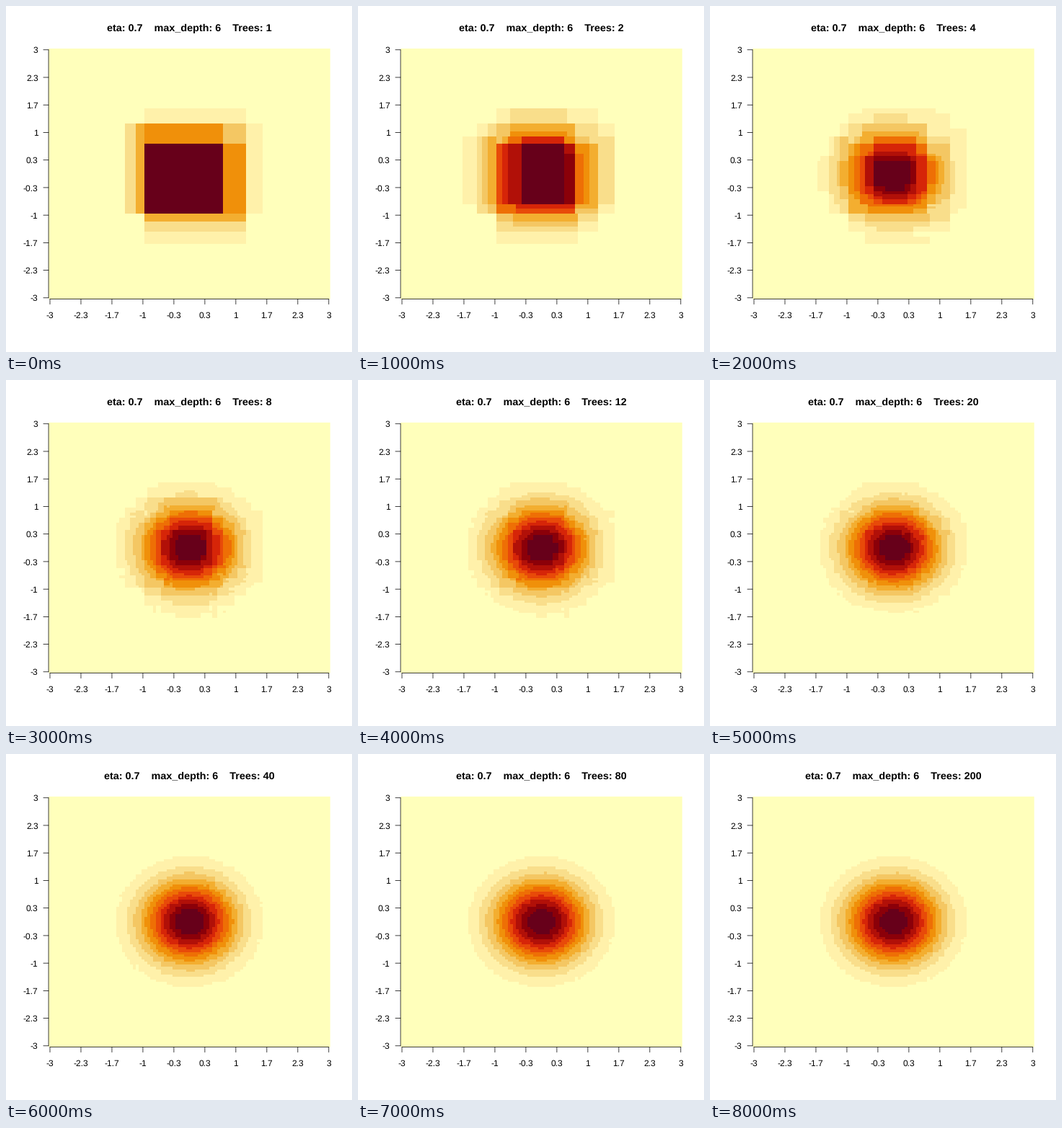
Recreate the animation shown at these times as a matplotlib script. Size 480 px wide and 480 px high, loop 9000 ms.

```python
import numpy as np
import matplotlib.pyplot as plt
from matplotlib.animation import FuncAnimation

SIZE, DPI = 480, 80
PX = 72 / DPI                      # points per pixel
CELLS, ETA, DEPTH = 100, 0.7, 6
TREES = [1, 2, 4, 8, 12, 20, 40, 80, 200]
LEFT, RIGHT, TOP, BOTTOM = 59.04, 449.76, 59.04, 406.56
COLORS = ["#FFFFBB", "#FFF1AA", "#F9DE8B", "#F4C763", "#F3AE30", "#F0900A",
          "#EE6F05", "#E84A09", "#D62508", "#B11008", "#8B0009", "#67001A"]

plt.rcParams["font.family"] = "Liberation Sans"
plt.rcParams["text.hinting"] = "none"


def score(total, count):
    return np.float32(total ** 2 / (count + 1))


def best_cut(grad):
    """Best split of a block; ties go to x, then to the upper cut."""
    best, found = 1e-6, None
    for axis in (0, 1):
        n = grad.shape[axis]
        if n < 2:
            continue
        cum = grad.sum(axis=1 - axis, dtype=float).cumsum()
        low, total = cum[:-1], cum[-1]
        count = np.arange(1, n) * grad.shape[1 - axis]
        gain = (score(low, count) + score(total - low, grad.size - count)
                - score(total, grad.size))
        cut = n - 1 - int(np.argmax(gain[::-1]))
        if gain[cut - 1] > best:
            best, found = gain[cut - 1], (axis, cut)
    return found


def grow(grad, pred, depth=0):
    split = best_cut(grad) if depth < DEPTH else None
    if split is None:
        pred -= np.float32(ETA * grad.sum(dtype=float) / (grad.size + 1))
        return
    axis, cut = split
    for part in (slice(None, cut), slice(cut, None)):
        block = (part, slice(None)) if axis == 0 else (slice(None), part)
        grow(grad[block], pred[block], depth + 1)


def boost():
    """Fit a Gaussian bump with boosted trees, keeping the chosen stages."""
    x = np.linspace(-3, 3, CELLS)
    target = np.exp(-(x[:, None] ** 2 + x ** 2)).astype(np.float32)
    pred = np.full_like(target, 0.5)
    stages = []
    for n in range(1, TREES[-1] + 1):
        grow(pred - target, pred)
        if n in TREES:
            stages.append(pred.copy())
    return stages


def to_rgb(hex_code):
    return [int(hex_code[i:i + 2], 16) for i in (1, 3, 5)]


def cell_of(fraction):
    return np.clip(np.floor(fraction * CELLS), 0, CELLS - 1).astype(int)


def coverage(start, end):
    """Share of each pixel that lies between start and end."""
    return np.clip(np.minimum(pixel + 1, end) - np.maximum(pixel, start), 0, 1)


PALETTE = np.array([to_rgb(c) for c in COLORS])
pixel = np.arange(SIZE)
col = cell_of((pixel + 0.5 - LEFT) / (RIGHT - LEFT))
row = cell_of((BOTTOM - pixel - 0.5) / (BOTTOM - TOP))
alpha = np.outer(coverage(TOP, BOTTOM), coverage(LEFT, RIGHT))[..., None]


def heatmap(z):
    level = (z - z.min()) / (z.max() - z.min())
    bins = np.floor((len(COLORS) - 1e-5) * level).astype(int)
    rgb = PALETTE[bins[np.ix_(col, row)].T]
    return np.rint(255 + (rgb - 255) * alpha).astype(np.uint8)


fig = plt.figure(figsize=(SIZE / DPI, SIZE / DPI), dpi=DPI, facecolor="white")
ax = fig.add_axes([0, 0, 1, 1])
ax.axis("off")

images = [heatmap(z) for z in boost()]
picture = ax.imshow(images[0], extent=(0, SIZE, SIZE, 0),
                    interpolation="nearest", aspect="auto")
ax.set_xlim(0, SIZE)
ax.set_ylim(SIZE, 0)


def line(x0, y0, x1, y1):
    ax.plot([x0, x1], [y0, y1], color="black", lw=0.75 * PX,
            solid_capstyle="round", snap=False)


half_w = (RIGHT - LEFT) / CELLS / 2
half_h = (BOTTOM - TOP) / CELLS / 2
xs = np.linspace(LEFT + half_w, RIGHT - half_w, 10)
ys = np.linspace(BOTTOM - half_h, TOP + half_h, 10)
tick = 7.2

line(xs[0], BOTTOM, xs[-1], BOTTOM)
line(LEFT, ys[0], LEFT, ys[-1])
for tx, ty, value in zip(xs, ys, np.linspace(-3, 3, 10)):
    label = f"{round(value, 1):g}"
    line(tx, BOTTOM, tx, BOTTOM + tick)
    line(LEFT - tick, ty, LEFT, ty)
    ax.text(tx, 433.2, label, size=12 * PX, ha="center", va="baseline")
    ax.text(LEFT - 2 * tick, ty + 4.5, label, size=12 * PX,
            ha="right", va="baseline")

title = ax.text((LEFT + RIGHT) / 2, 35, "", size=14.4 * PX, weight="bold",
                ha="center", va="baseline")


def update(i):
    picture.set_data(images[i])
    title.set_text(f"eta: {ETA}    max_depth: {DEPTH}    Trees: {TREES[i]}")
    return picture, title


anim = FuncAnimation(fig, update, frames=len(TREES), interval=1000,
                     repeat=True, repeat_delay=0)
plt.show()
```
